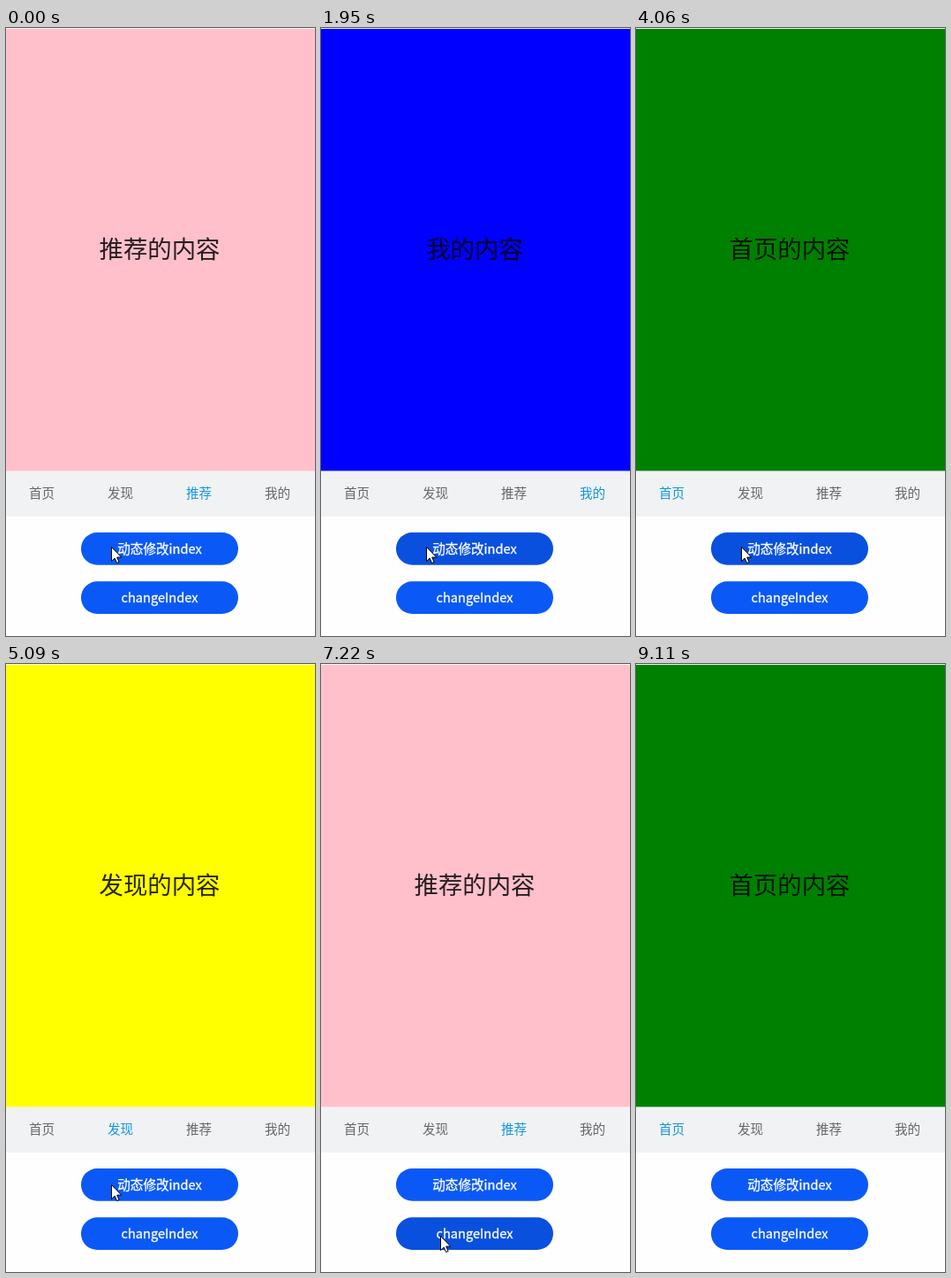
Write an HTML page that moves like this. It is 350x687 px and loops after 9.98 s.

```html
<!DOCTYPE html>
<html lang="zh-CN">
<head>
<meta charset="utf-8">
<style>
  html, body { margin: 0; width: 100%; height: 100%; overflow: hidden; background: #fefefe; }
  svg { display: block; }
  text { font-family: "Noto Sans CJK SC", "Noto Sans CJK", sans-serif; font-size: 14.6px; text-anchor: middle; }
  #title { font-size: 27.4px; fill: rgba(0, 0, 0, .85); }
  .label { fill: #fff; stroke: #fff; stroke-width: .3px; }
</style>
</head>
<body>
<svg width="350" height="687" viewBox="0 0 350 687">
  <rect y="500" width="350" height="52" fill="#f1f2f4"/>
  <rect id="page" y=".9" width="350" height="499.5"/>
  <text id="title" x="174" y="260"></text>
  <g id="tabs"></g>
  <rect class="button" x="85" y="570" width="178" height="36.7" rx="18.3"/>
  <text class="label" x="174" y="594">动态修改index</text>
  <rect class="button" x="85" y="625.3" width="178" height="36.7" rx="18.3"/>
  <text class="label" x="174" y="649">changeIndex</text>
  <path id="cursor" d="M.5.5V16.6L4.2 13.1 6.6 18.6 9.1 17.5 6.7 12.1H11.7Z" fill="#fff" stroke="#000"/>
</svg>
<script>
const $ = id => document.getElementById(id);
const LOOP = 9980;
const names = ['首页', '发现', '推荐', '我的'];
const titles = ['首页的内容', '发现的内容', '推荐的内容', '我的内容'];
const colors = ['#008000', '#ffff00', '#ffc0cb', '#0000ff'];

// Each press: button, start, page switch, release, new page
const presses = [
  [0, 1870, 1950, 1990, 3],
  [0, 2940, 3020, 3020, 0],
  [0, 4060, 4140, 4140, 1],
  [1, 6020, 6140, 6140, 2],
  [1, 7220, 7300, 7300, 3],
  [1, 8420, 8500, 8500, 0]
];

const tabs = names.map((name, i) => {
  const tab = document.createElementNS('http://www.w3.org/2000/svg', 'text');
  tab.textContent = name;
  tab.setAttribute('x', 40.5 + 89 * i);
  tab.setAttribute('y', 531);
  $('tabs').append(tab);
  return tab;
});
const buttons = [...document.querySelectorAll('.button')];
const clamp = v => Math.max(0, Math.min(1, v));

function cursorAt(t) {
  if (t < 8990) {
    const p = clamp((t - 5040) / 490), e = p * p * (3 - 2 * p);
    return [119 + 16 * e, 586 + 60 * e];
  }
  const p = clamp((t - 8950) / 120);
  return [135 - 100 * p ** 1.5, 646 + 36 * p ** 1.5];
}

function draw(t) {
  let page = 2, down = -1;
  for (const [button, start, change, end, next] of presses) {
    if (t >= change) page = next;
    if (t >= start && t < end) down = button;
  }
  $('page').setAttribute('fill', colors[page]);
  $('title').textContent = titles[page];
  tabs.forEach((tab, i) => tab.setAttribute('fill', i === page ? '#1296db' : '#666'));
  buttons.forEach((b, i) => b.setAttribute('fill', i === down ? '#0950de' : '#0a59f7'));
  $('cursor').setAttribute('transform', `translate(${cursorAt(t).map(Math.round)})`);
  $('cursor').style.display = t < 9110 ? '' : 'none';
}

const begin = performance.now();
function tick() {
  draw((performance.now() - begin) % LOOP);
  requestAnimationFrame(tick);
}
tick();
</script>
</body>
</html>
```
